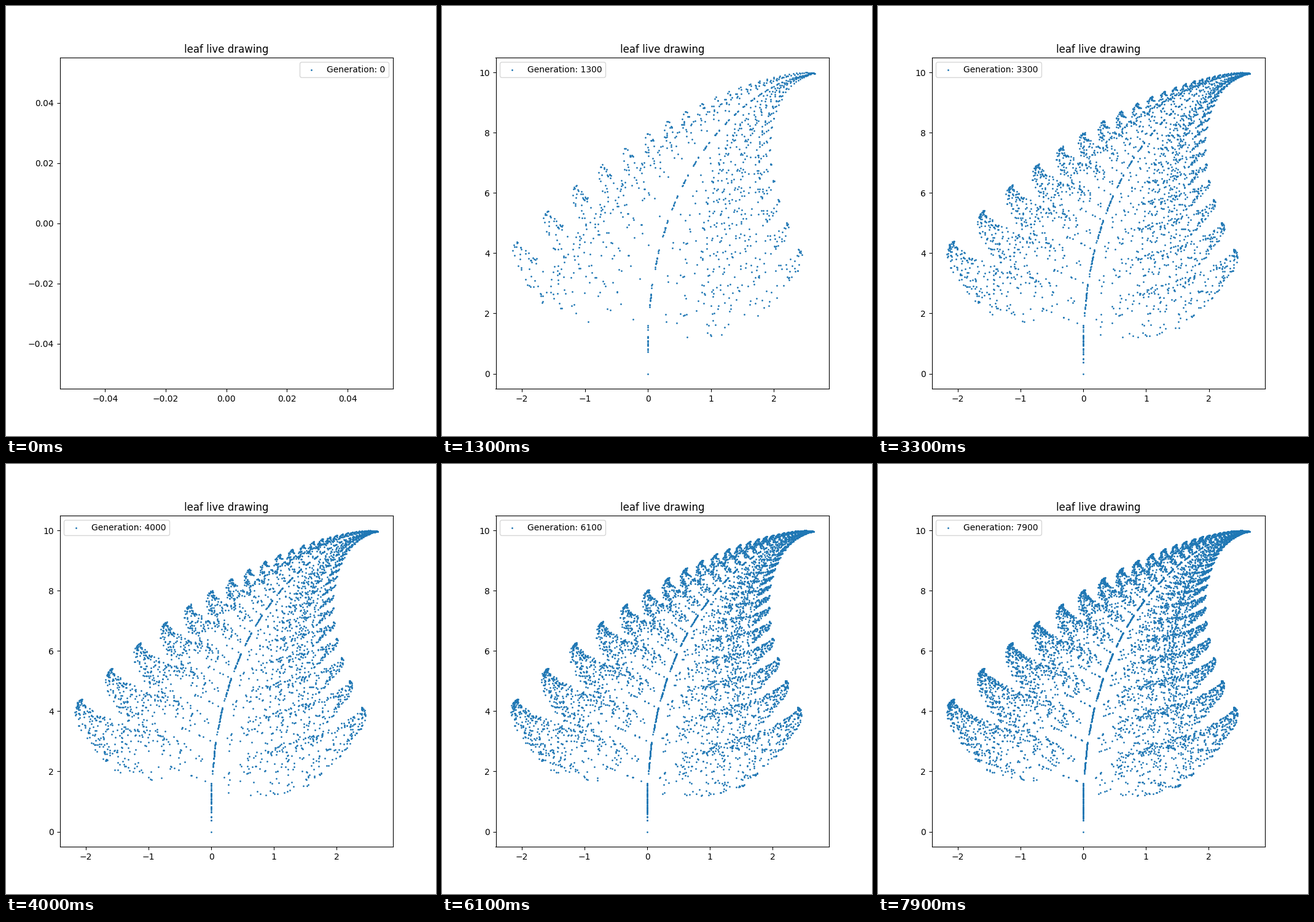
Recreate the animation shown at these times as a matplotlib script. Size 700 by 700 pixels, loop 8 s.

```python
import math
import random

import matplotlib.pyplot as plt
import numpy as np
from matplotlib.animation import FuncAnimation

FRAMES = 80
STEP = 100  # new points per frame

# x' = a x + b y,  y' = c x + d y + f
STEM = (0.00, 0.00, 0.00, 0.16, 0.00)
BODY = (0.85, 0.04, -0.04, 0.85, 1.60)
LEFT = (0.20, -0.26, 0.23, 0.22, 1.60)
RIGHT = (-0.15, 0.28, 0.26, 0.24, 1.05)


def grow(count):
    rng = random.Random(7)
    x = y = 0.0
    points = [(x, y)]
    picks = rng.choices([STEM, BODY, LEFT, RIGHT], [1, 85, 7, 7], k=count - 1)
    for rule in picks:
        # Only high points fall to the stem, which leaves gaps along the rib.
        if rule is STEM and y < 2.08:
            rule = BODY
        a, b, c, d, f = rule
        x, y = a * x + b * y, c * x + d * y + f
        points.append((x, y))
    return np.array(points)


def padded(lo, hi):
    pad = 0.05 * (hi - lo)
    return lo - pad, hi + pad


def limits(k):
    """The view widens slightly as the tip of the leaf fills in."""
    if k == 0:
        return padded(-0.05, 0.05), padded(-0.05, 0.05)
    tip = 2.656 - 0.07 * math.exp(-k / 10)
    return padded(-2.175, tip), padded(0, 9.997)


leaf = grow(FRAMES * STEP)

fig, ax = plt.subplots(figsize=(7, 7), dpi=100)
ax.set_title("leaf live drawing")
dots = ax.scatter([], [], s=1, color="tab:blue")


def draw(k):
    n = k * STEP
    dots.set_offsets(leaf[:n])
    dots.set_label(f"Generation: {n}")
    xlim, ylim = limits(k)
    ax.set_xlim(xlim)
    ax.set_ylim(ylim)
    ax.legend(loc="upper left" if k else "upper right")
    return [dots]


anim = FuncAnimation(fig, draw, frames=FRAMES, interval=100, repeat=True,
                     repeat_delay=0, blit=False)
plt.show()
```
